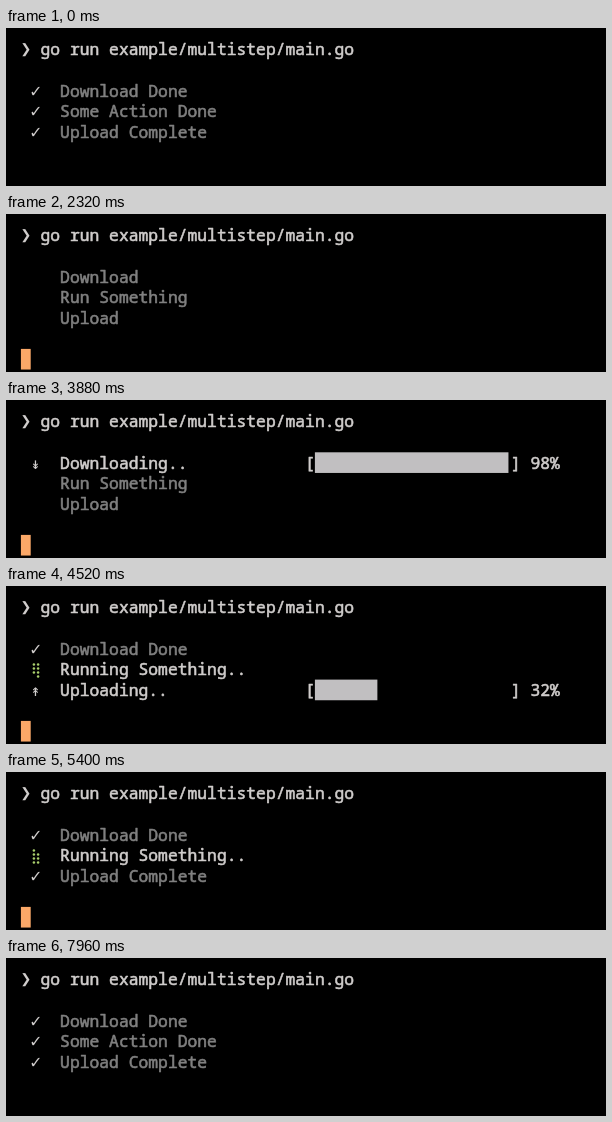
Write an HTML page with a canvas that moves like this. It is 600 px wide and 158 px high and loops after 8240 ms.

```html
<!DOCTYPE html>
<html lang="en">
<head>
<meta charset="utf-8">
<title>Multistep terminal</title>
<style>
html, body { margin: 0; width: 100%; height: 100%; overflow: hidden; background: #000; }
canvas { display: block; }
</style>
</head>
<body>
<canvas id="stage" width="600" height="158"></canvas>
<script>
const ctx = document.getElementById('stage').getContext('2d');
const LOOP = 8240, STEP = 40;
const LEFT = 14.9, TOP = 11, CELL = 9.8, ROW = 20.65, BASE = 16.45;
const LIGHT = '#d0cdcc', GRAY = '#808080', BAR = '#c1bfc1', CURSOR = '#fba868', GREEN = '#a9cf6c';
const TEXT_FONT = '16.3px "Noto Sans Mono", "DejaVu Sans Mono", monospace';
const ICON_FAMILY = '"DejaVu Sans Mono", "Noto Sans Mono", monospace';

// Key moments in ms
const ENTER = 1800, LIST = 2200, DOWNLOAD = 2720, RUN = 3920, UPLOAD = 4120, UPLOADED = 5320, DONE = 5520;

// Missing dot of the braille spinner as [column, row], one per tick
const GAPS = [[0, 0], [0, 1], [0, 2], [0, 3], [1, 3], [1, 2], [1, 1], [1, 0]];
const TICK = 200;

const colX = c => LEFT + c * CELL;
const rowY = r => TOP + r * ROW;

// A thin outline gives the regular face a semibold weight
function text(str, col, row, color) {
  ctx.font = TEXT_FONT;
  ctx.textAlign = 'left';
  ctx.fillStyle = ctx.strokeStyle = color;
  ctx.lineWidth = 0.6;
  ctx.lineJoin = 'round';
  const y = Math.round(rowY(row) + BASE);
  [...str].forEach((ch, i) => {
    ctx.fillText(ch, colX(col + i), y);
    ctx.strokeText(ch, colX(col + i), y);
  });
}

function icon(ch, col, row, size = 18) {
  ctx.font = `${size}px ${ICON_FAMILY}`;
  ctx.textAlign = 'center';
  ctx.fillStyle = LIGHT;
  ctx.fillText(ch, colX(col + 0.5), Math.round(rowY(row) + BASE));
}

function cursor(row) {
  ctx.fillStyle = CURSOR;
  ctx.fillRect(LEFT, rowY(row), CELL, ROW);
}

function spinner(row, time) {
  const [gapX, gapY] = GAPS[Math.floor(time / TICK) % GAPS.length];
  ctx.fillStyle = GREEN;
  for (let x = 0; x < 2; x++) {
    for (let y = 0; y < 4; y++) {
      if (x === gapX && y === gapY) continue;
      ctx.beginPath();
      ctx.arc(27.9 + x * 4.2, rowY(row) + 5.6 + y * 4, 1.25, 0, Math.PI * 2);
      ctx.fill();
    }
  }
}

function progress(row, percent) {
  const cells = Math.round(percent / 100 * 20 * 8) / 8;
  text('[', 29, row, LIGHT);
  text(']', 50, row, LIGHT);
  text(String(Math.floor(percent)).padStart(2) + '%', 52, row, LIGHT);
  ctx.fillStyle = BAR;
  ctx.fillRect(colX(30), rowY(row), cells * CELL, ROW);
}

function finished(label, row) {
  icon('✓', 1, row);
  text(label, 4, row, GRAY);
}

function transfer(arrow, label, row, percent) {
  icon(arrow, 1, row, 16);
  text(label, 4, row, LIGHT);
  progress(row, percent);
}

function downloadRow(t) {
  if (t < DOWNLOAD) text('Download', 4, 2, GRAY);
  else if (t < RUN) transfer('↡', 'Downloading..', 2, (t - DOWNLOAD + 6) / 11.79);
  else finished('Download Done', 2);
}

function actionRow(t) {
  if (t < RUN) text('Run Something', 4, 3, GRAY);
  else if (t < DONE) {
    spinner(3, t - RUN);
    text('Running Something..', 4, 3, LIGHT);
  } else finished('Some Action Done', 3);
}

function uploadRow(t) {
  if (t < UPLOAD) text('Upload', 4, 4, GRAY);
  else if (t < UPLOADED) {
    const u = Math.min(1, (t - UPLOAD) / 1040);
    transfer('↟', 'Uploading..', 4, 100 * u ** 1.19);
  } else finished('Upload Complete', 4);
}

function draw(time) {
  const t = Math.floor(time / STEP) * STEP;
  ctx.fillStyle = '#000';
  ctx.fillRect(0, 0, 600, 158);
  icon('❯', 0, 0);
  text('go run example/multistep/main.go', 2, 0, LIGHT);

  if (t >= ENTER && t < LIST) {
    cursor(1);
    return;
  }
  // The previous run stays on screen until the command starts again
  const state = t < ENTER ? LOOP : t;
  downloadRow(state);
  actionRow(state);
  uploadRow(state);
  if (state < DONE) cursor(6);
}

const start = performance.now();
function loop() {
  draw((performance.now() - start) % LOOP);
  requestAnimationFrame(loop);
}
loop();
</script>
</body>
</html>
```
